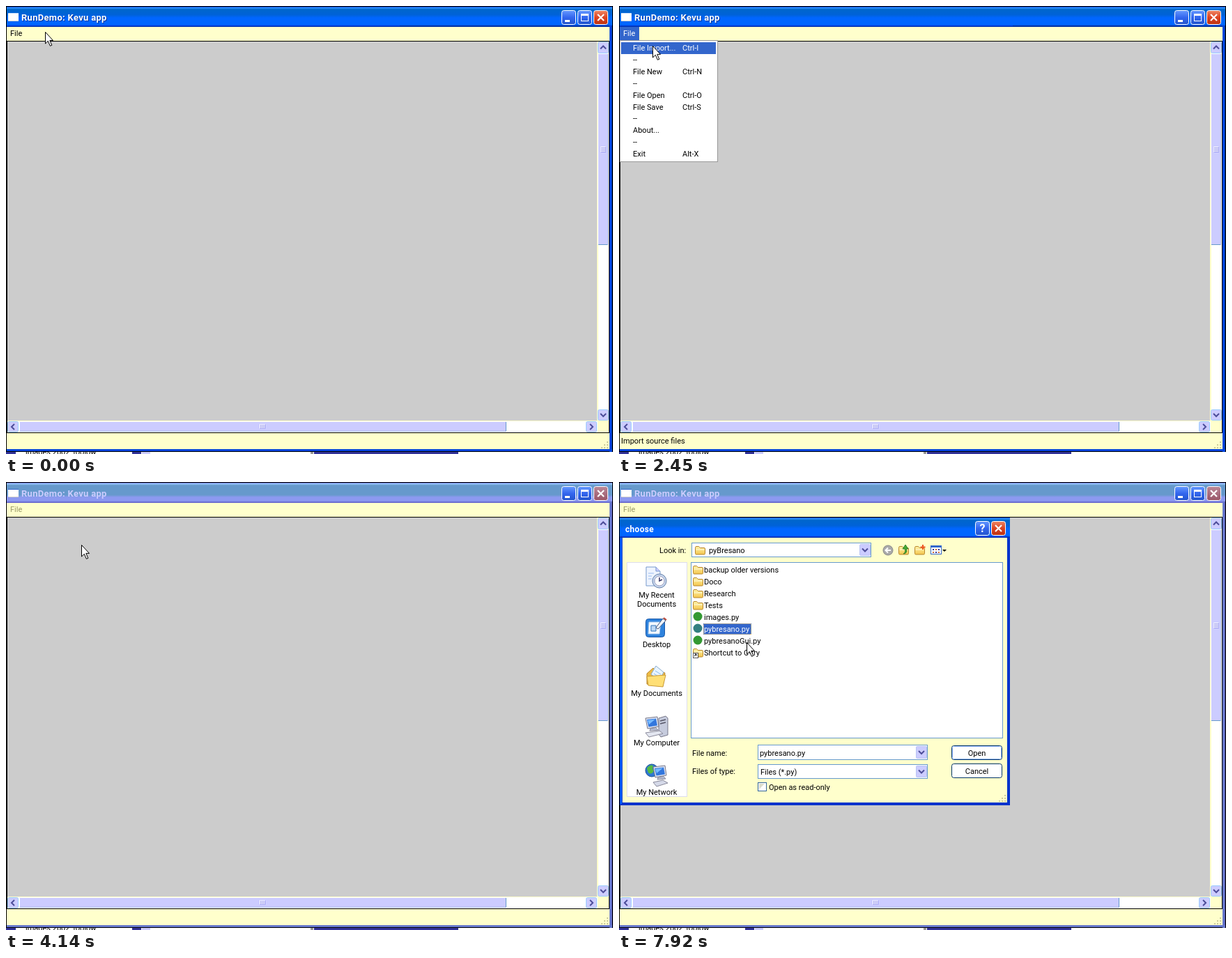
Animation, 871 px wide and 643 px high, one loop 8000 ms. Source, as an HTML page:

```html
<!DOCTYPE html>
<html lang="en">
<head>
<meta charset="utf-8">
<title>Import dialog</title>
<style>
  html, body { margin: 0; width: 100%; height: 100%; overflow: hidden; background: #000; }
  svg { display: block; width: 100%; height: 100%; font: 11px Roboto, "Liberation Sans", sans-serif; }
  text { white-space: pre; }
  .px { shape-rendering: crispEdges; }
  .bold { font-weight: 700; letter-spacing: .3px; }
  .mid { text-anchor: middle; }
</style>
</head>
<body>
<svg id="stage" viewBox="0 0 871 643" xmlns="http://www.w3.org/2000/svg"></svg>
<script>
const LOOP = 8000;
const CREAM = '#ffffcc', LILAC = '#ccccff', BLUE = '#3366cc', EDGE = '#6699cc', GLYPH = '#4d4d99';

const rect = (x, y, w, h, fill, more = '') =>
  `<rect class="px" x="${x}" y="${y}" width="${w}" height="${h}" fill="${fill}" ${more}/>`;
const box = (x, y, w, h, fill, line) =>
  rect(x + .5, y + .5, w - 1, h - 1, fill, `stroke="${line}"`);
const round = (x, y, w, h, rad, fill, line) =>
  `<rect x="${x + .5}" y="${y + .5}" width="${w - 1}" height="${h - 1}" rx="${rad}" fill="${fill}" stroke="${line}"/>`;
const text = (x, y, s, more = '') => `<text x="${x}" y="${y}" ${more}>${s}</text>`;
const path = (d, fill, line = 'none', width = 1) =>
  `<path d="${d}" fill="${fill}" stroke="${line}" stroke-width="${width}"/>`;
const at = (x, y, body, more = '') => `<g transform="translate(${x} ${y})" ${more}>${body}</g>`;
const group = (id, body) => `<g id="${id}">${body}</g>`;
const range = (n, f) => Array.from({ length: n }, (_, i) => f(i)).join('');
const gradient = (id, stops) => `<linearGradient id="${id}" x2="0" y2="1">` +
  stops.map(([o, c]) => `<stop offset="${o}" stop-color="${c}"/>`).join('') + '</linearGradient>';

const defs = '<defs>' +
  gradient('live', [[0, '#0033cc'], [.06, '#3399ff'], [.13, '#0066cc'], [.4, '#0062d8'], [.55, '#0066ff'], [.9, '#0066ff'], [.96, '#0033cc'], [1, '#003399']]) +
  gradient('dull', [[0, '#6666cc'], [.06, '#99ccff'], [.13, '#6699cc'], [.6, '#6699cc'], [.72, '#8c99f0'], [.9, '#8c99f0'], [.97, '#6666cc'], [1, '#6666cc']]) +
  gradient('blueBtn', [[0, '#6699ff'], [.5, '#3366ee'], [1, '#2255cc']]) +
  gradient('redBtn', [[0, '#ee8866'], [.5, '#dd4422'], [1, '#bb3311']]) +
  gradient('dullRed', [[0, '#bb8899'], [1, '#995566']]) +
  gradient('folder', [[0, '#fff3a8'], [1, '#f3c64f']]) +
  '<clipPath id="sliver"><rect x="0" y="639" width="871" height="4"/></clipPath>' +
  '<clipPath id="places"><rect x="12" y="115" width="85" height="336"/></clipPath></defs>';

// Window furniture
const chevron = (x, y, turn = 0) =>
  `<path transform="translate(${x} ${y}) rotate(${turn})" d="M-4-2L0 2L4-2" fill="none" stroke="${GLYPH}" stroke-width="2"/>`;
const arrowBtn = (x, y, w, h, turn) =>
  round(x, y, w, h, 2, LILAC, '#99ccff') + chevron(x + w / 2, y + h / 2, turn);
const grip = (x, y) => range(3, i => range(i + 1, j =>
  rect(x + 8 - 4 * j, y + 4 * i, 2, 2, '#cccc99')));
const capBtn = (x, y, fill, glyph) =>
  round(x, y, 21, 21, 3, fill, '#fff') + at(x, y, glyph);
const cross = path('M6 6L15 15M15 6L6 15', 'none', '#fff', 2.2);
const minus = rect(5, 14, 7, 3, '#fff');
const square = rect(5.5, 6, 10, 9, 'none', 'stroke="#fff"') + rect(5, 5, 11, 3, '#fff');

function caption(live) {
  const edge = live ? '#0044dd' : '#6677cc';
  const ink = live ? '#fff' : LILAC;
  return rect(1, 1, 869, 29, `url(#${live ? 'live' : 'dull'})`) +
    rect(866, 28, 4, 612, edge) + rect(869, 28, 1, 612, live ? '#003399' : '#5555aa') +
    rect(1, 636, 869, 3, edge) +
    (live ? rect(565, 28, 300, 1, '#003399') + text(23, 22, 'RunDemo: Kevu app', 'class="bold" font-size="13" fill="#003399"') : '') +
    rect(3, 10, 15, 12, '#fff') + rect(3, 10, 15, 1, live ? '#cce0ff' : '#3366cc') + rect(3, 21, 15, 1, '#cccccc') +
    text(22, 21, 'RunDemo: Kevu app', `class="bold" font-size="13" fill="${ink}"`) +
    capBtn(797, 6, 'url(#blueBtn)', minus) + capBtn(820, 6, 'url(#blueBtn)', square) +
    capBtn(843, 6, live ? 'url(#redBtn)' : 'url(#dullRed)', cross);
}

const scrollbars =
  rect(848, 51, 17, 561, CREAM) + rect(850, 51, 15, 544, '#fff') +
  arrowBtn(849, 51, 16, 17, 180) + arrowBtn(849, 579, 16, 16, 0) +
  round(849, 68, 15, 275, 1, LILAC, '#fff') + rect(850, 342, 14, 1, EDGE) + rect(863, 69, 1, 274, '#aabbee') +
  range(4, i => rect(853, 202 + 2 * i, 7, 1, '#fff') + rect(854, 203 + 2 * i, 7, 1, '#9999ee')) +
  rect(2, 595, 847, 17, '#fff') + rect(2, 595, 847, 1, CREAM) +
  arrowBtn(2, 596, 16, 16, 90) + arrowBtn(832, 596, 16, 16, -90) +
  round(19, 596, 699, 15, 1, LILAC, '#fff') + rect(717, 597, 1, 14, EDGE) + rect(20, 610, 698, 1, '#aabbee') +
  range(4, i => rect(364 + 2 * i, 600, 1, 6, '#fff') + rect(365 + 2 * i, 601, 1, 6, '#9999ee'));

const below = rect(0, 640, 871, 3, '#fff') + rect(0, 640, 14, 3, '#333399') + rect(181, 640, 13, 3, '#333399') +
  rect(195, 640, 12, 3, LILAC) + rect(437, 640, 4, 3, '#999999') + rect(442, 640, 207, 3, '#333399') +
  text(28, 644, 'images 2002, toolow', 'clip-path="url(#sliver)"');

const main = rect(0, 0, 871, 643, '#000') + below + rect(1, 30, 865, 20, CREAM) +
  rect(2, 51, 846, 544, '#cccccc') + scrollbars + rect(1, 613, 865, 23, CREAM) + grip(854, 625) +
  group('live-cap', caption(true)) + group('dull-cap', caption(false)) +
  group('file-bg', rect(1, 30, 28, 19, BLUE)) + text(6, 43, 'File', 'id="file"') +
  text(3, 628, 'Import source files', 'id="status"');

// Drop-down menu
const items = [['File Import...', 'Ctrl-I'], ['--'], ['File New', 'Ctrl-N'], ['--'], ['File Open', 'Ctrl-O'],
  ['File Save', 'Ctrl-S'], ['--'], ['About...'], ['--'], ['Exit', 'Alt-X']];
const menu = box(1, 49, 141, 175, '#fff', '#999999') + group('item-bg', rect(3, 52, 136, 17, BLUE)) +
  items.map(([name, key = ''], i) => {
    const y = Math.round(64 + 16.9 * i);
    return `<g ${i ? '' : 'id="item"'}>${text(20, y, name)}${text(91, y, key)}</g>`;
  }).join('');

// Icons, each drawn from its top left corner
const folder = path('M.5 3.5Q.5 1.5 2 1.5H5.5L7.5 3.5H13Q14.5 3.5 14.5 5V11.5Q14.5 13 13 13H2Q.5 13 .5 11.5Z', 'url(#folder)', '#b8862d') +
  path('M1.5 6H13.5', 'none', '#fffbe0');
const link = rect(0, 7, 7, 7, '#fff', 'stroke="#333" stroke-width=".8"') + path('M2 12L5 9M2.5 9H5V11.5', 'none', '#000');
const sheet = box(1, 0, 13, 15, '#fff', '#666699') + rect(3, 3, 9, 3, BLUE) + rect(3, 7, 9, 5, LILAC) +
  path('M4 9.5H6M8 9.5H11', 'none', '#333366', 2);
const page = (fill, line) => path('M1 0H15L21 6V27H1Z', fill, line) + path('M15 0V6H21', LILAC, line);
const monitor = (x, y) => at(x, y, path('M0 2L17 0L19 14L3 17Z', '#dde3f2', '#778') +
  path('M2 4L15 2.5L17 12.5L4.5 14.5Z', '#3377dd') + path('M3 5L14 3.5L5 11Z', '#77bbff') +
  path('M7 17L15 15.5L18 19L6 20Z', '#b8bfd4', '#889'));

const recent = at(38, 122, page('#eef4ff', '#7799cc') + path('M4 9H12M4 13H9M4 17H9', 'none', '#99bbee') +
  '<circle cx="20" cy="20" r="10" fill="#c7d8ee" stroke="#667fa8"/><circle cx="20" cy="20" r="7" fill="#fff" stroke="#99b"/>' +
  path('M20 15V20L24 18', 'none', '#333366', 1.5));
const desktop = at(37, 192, round(1, 4, 28, 27, 4, '#2f83dd', '#1857a8') +
  path('M6 9H23L21 26H5Z', '#f4f9ff', '#aaccee') + path('M9 22V14H16V22Z', '#bcd8f5', '#3377bb') +
  path('M16 17L26 4L30 7L19 19Z', '#eef4ff', '#445577') + path('M27 3L31 6', 'none', '#bb4433', 2));
const documents = at(38, 264, path('M2 11L11 3L15 7L28 10L25 29L2 26Z', '#eebb44', '#b8862d') +
  path('M8 12L15 0L26 9L20 21Z', '#e8f4ff', '#88aacc') + path('M12 11L20 16M14 7L22 12', 'none', '#88bbee') +
  path('M2 15L29 13L25 30L4 28Z', '#ffdf75', '#c99a36'));
const computer = path('M57 339L67 336L70 339V363L60 366L57 362Z', '#c6cbdd', '#778') +
  path('M59 343L67 341M59 347L67 345', 'none', '#556', 1.5) + monitor(38, 337) +
  path('M38 360L58 357L63 361L43 366Z', '#e3e6f0', '#889');
const network = '<circle cx="47" cy="414" r="9" fill="#2e78d2" stroke="#1c4f94"/>' +
  path('M40 411Q44 405 49 407Q47 412 50 415Q46 421 42 417Z', '#55bb44') + monitor(49, 407) +
  path('M49 431L63 428L70 432L54 437Z', '#d5d9e8', '#889');
const places = `<g clip-path="url(#places)">` + rect(12, 115, 85, 337, '#fff') + recent + desktop + documents + computer + network +
  [['My Recent', 166], ['Documents', 179], ['Desktop', 237], ['My Documents', 307], ['My Computer', 378], ['My Network', 449]]
    .map(([s, y]) => text(54, y, s, 'class="mid"')).join('') + '</g>' + box(11, 115, 87, 337, 'none', '#ddddee');

const tools = '<circle cx="386" cy="98" r="7" fill="#aaaaaa" stroke="#888888"/>' +
  path('M390 98H383M386 94.5L382.5 98L386 101.5', 'none', '#fff', 2) +
  at(401, 91, folder) + path('M408 103Q412 101 410 96H407L411 90L415 96H412.5Q414 103 408 103Z', '#44aa33', '#227722', .8) +
  at(424, 91, folder) + path('M436 90V97M432.5 93.5H439.5', 'none', '#ee5522', 2) +
  box(447, 91, 16, 13, '#fff', '#3366cc') + rect(447, 91, 16, 3, BLUE) +
  range(6, i => rect(450 + 4 * (i % 3), 96 + 4 * (i > 2), 2, 2, i % 2 ? '#cc6633' : '#333399')) +
  path('M464 97H470L467 100Z', '#000');

// File dialog
const drop = (x, y, h) => round(x, y, 16, h, 1, LILAC, '#b8c4f4') + chevron(x + 8, y + h / 2);
const button = (y, name, glow) => round(477, y, 73, 21, 3, '#fff', '#003366') +
  (glow ? round(478, y + 1, 71, 19, 2, '#fff', '#99bbff') : '') + text(513.5, y + 15, name, 'class="mid"');
const names = ['backup older versions', 'Doco', 'Research', 'Tests', 'images.py', 'pybresano.py', 'pybresanoGui.py', 'Shortcut to C-try'];
const PICK = 5;
const rows = names.map((s, i) => {
  const y = 130 + 17 * i, id = i === PICK ? 'id="pick"' : '';
  const dot = `<circle ${i === PICK ? 'id="pick-dot"' : ''} cx="113" cy="${y - 5}" r="6.5" fill="#339933"/>`;
  const icon = i < 4 ? at(106, y - 11, folder)
    : i < 7 ? dot
    : group('sheet', at(106, y - 12, sheet)) + group('link', at(106, y - 11, folder + link));
  return icon + text(122, y, s, id);
}).join('');

const dialog = rect(1, 51, 560, 413, '#0033cc') + rect(2, 79, 2, 383, '#0066ff') + rect(1, 51, 560, 29, 'url(#live)') +
  rect(5, 80, 552, 380, CREAM) + text(9, 72, 'choose', 'class="bold" font-size="12" fill="#fff"') +
  capBtn(511, 56, 'url(#blueBtn)', text(10.5, 16, '?', 'class="mid" font-size="16" font-weight="700" fill="#fff"')) +
  capBtn(534, 56, 'url(#redBtn)', cross) +
  text(58, 102, 'Look in:') + box(104, 87, 258, 21, '#fff', EDGE) + drop(345, 89, 17) + at(109, 91, folder) +
  text(129, 102, 'pyBresano') + tools + places +
  box(103, 115, 448, 253, '#fff', EDGE) + rect(121, 203, 69, 16, CREAM, 'id="pick-bg"') + rows +
  rect(121.5, 203.5, 68, 15, 'none', 'id="focus" stroke="#ffcc66" stroke-dasharray="1 1"') +
  text(105, 393, 'File name:') + box(199, 377, 244, 22, '#fff', EDGE) + drop(426, 379, 18) +
  rect(202, 381, 1, 14, '#000', 'id="caret"') + text(202, 393, 'pybresano.py', 'id="chosen"') +
  text(105, 419, 'Files of type:') + box(199, 405, 244, 21, '#fff', EDGE) + drop(426, 407, 17) + text(203, 420, 'Files (*.py)') +
  box(199, 431, 13, 13, '#fff', '#336699') + path('M201 433H209L201 441Z', '#ddddcc') + text(215, 442, 'Open as read-only') +
  button(378, 'Open', true) + button(404, 'Cancel', false) + grip(545, 449);

const cursor = path('M.5.5V17L4.3 13.3L7.4 20.3L9.8 19.3L6.8 12.4H11.5Z', '#fff', '#000');

const stage = document.getElementById('stage');
stage.innerHTML = defs + main + group('menu', menu) + group('dialog', dialog) + group('cursor', cursor);

// Timing: every change is a hard step
function steps(id, prop, list) {
  const frames = list.map(([ms, v]) => ({ offset: ms / LOOP, [prop]: v, easing: 'steps(1, end)' }));
  frames.push({ offset: 1, [prop]: list[list.length - 1][1] });
  document.getElementById(id).animate(frames, { duration: LOOP, iterations: Infinity });
}
function show(id, from, to = LOOP) {
  const list = from ? [[0, 'hidden'], [from, 'visible']] : [[0, 'visible']];
  if (to < LOOP) list.push([to, 'hidden']);
  steps(id, 'visibility', list);
}

show('live-cap', 0, 3470);
show('dull-cap', 3470);
show('file-bg', 740, 2780);
show('menu', 1780, 2780);
show('item-bg', 2090, 2780);
show('status', 2090, 2780);
show('dialog', 4490);
show('sheet', 4490, 5170);
show('link', 5170);
show('caret', 5500, 6200);
show('chosen', 6200);
show('pick-bg', 6200);
show('focus', 7570);

steps('file', 'fill', [[0, '#000'], [740, '#fff'], [2780, '#000'], [3470, '#999966']]);
steps('item', 'fill', [[0, '#000'], [2090, '#fff']]);
steps('pick-bg', 'fill', [[0, CREAM], [6560, BLUE]]);
steps('pick', 'fill', [[0, '#000'], [6560, '#fff']]);
steps('pick-dot', 'fill', [[0, '#339933'], [6560, '#338080']]);

const trail = [[0, 56, 37], [100, 33, 37], [740, 6, 37], [1070, 10, 37], [1410, 13, 38], [2090, 28, 53], [2450, 48, 57],
  [3470, 51, 60], [4140, 108, 90], [5170, 125, 140], [5500, 140, 198], [5900, 144, 207], [6910, 156, 214],
  [7570, 173, 228], [7920, 183, 230]];
steps('cursor', 'transform', trail.map(([ms, x, y]) => [ms, `translate(${x}px, ${y}px)`]));
</script>
</body>
</html>
```
